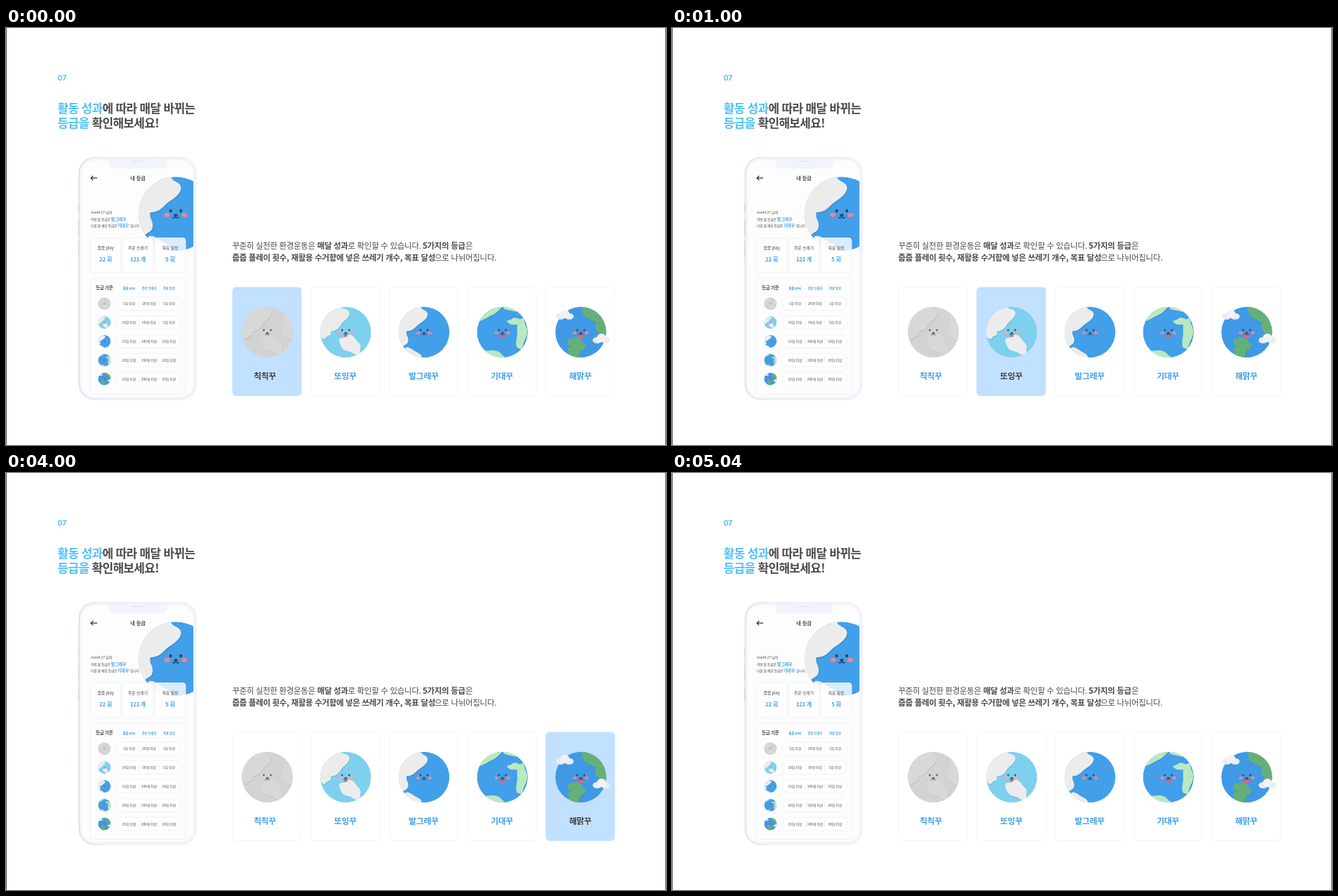
An HTML page that plays this animation: 941x595 px, repeating every 5110 ms.

```html
<!DOCTYPE html>
<html lang="ko">
<head>
<meta charset="utf-8">
<style>
html, body { margin: 0; width: 100%; height: 100%; overflow: hidden; background: #fff; }
svg { display: block; width: 941px; height: 595px; }
text { font-family: "Noto Sans CJK KR", "Noto Sans CJK JP", "Noto Sans CJK", sans-serif; fill: #4a4a4a; }
.b { font-weight: 700; }
.sky { fill: #50c0f8; }
.blue { fill: #3c9fee; }
.mid { text-anchor: middle; }
</style>
</head>
<body>
<svg id="stage" viewBox="0 0 941 595"></svg>
<script>
const R = 36.3, STEP = 111.7;

const box = (x, y, w, h, r, fill = '#fff', stroke = '#f1f2f4', extra = '') =>
  `<rect x="${x}" y="${y}" width="${w}" height="${h}" rx="${r}" fill="${fill}" stroke="${stroke}" ${extra}/>`;

const text = (x, y, size, str, cls = '', gap = 0, extra = '') =>
  `<text x="${x}" y="${y}" font-size="${size}" class="${cls}" letter-spacing="${gap}" ${extra}>${str}</text>`;

const dot = (x, y, rx, ry, fill) => `<ellipse cx="${x}" cy="${y}" rx="${rx}" ry="${ry}" fill="${fill}"/>`;

// Tilted ellipse with a wavy coast; the wave phase follows from its place
function land(x, y, rx, ry, tilt = 0) {
  const pts = Array.from({ length: 72 }, (_, i) => {
    const a = i * Math.PI / 36;
    const r = 1 + 0.1 * Math.sin(3 * a + x) + 0.08 * Math.sin(5 * a + y);
    return [(r * rx * Math.cos(a)).toFixed(1), (r * ry * Math.sin(a)).toFixed(1)];
  });
  return `<polygon points="${pts.join(' ')}" transform="translate(${x} ${y}) rotate(${tilt})"/>`;
}

function face(ink, cheek, tongue) {
  const side = s => dot(s * 5, -3, 1.3, 1.6, ink) + dot(s * 8.5, 1, 2.8, 2, cheek);
  return side(-1) + side(1) + dot(0, 5.2, tongue, tongue * 0.8, '#f0626f') +
    `<path d="M-3.2 3Q-1.5 5 0 2.6Q1.5 5 3.2 3" fill="none" stroke="${ink}"/>` + dot(0, 1.2, 1.9, 1.3, ink);
}

const cloud = (x, y) => `<g transform="translate(${x} ${y})">` +
  [-6, 6, 0].map(dx => dot(dx, dx ? 2 : -1.5, 6.5, dx ? 4.5 : 6, dx ? '#ebecee' : '#f2f2f3')).join('') + '</g>';

const americas = land(-19, -20, 23, 17, -40) + land(-30, 0, 8, 9) + land(7, 18, 17, 11, 35);
const globes = [
  { name: '칙칙꾸', sea: '#d3d3d3', fill: '#d8d8d8', lands: americas + land(32, -12, 10, 24), face: face('#5d5d5d', 'none', 0) },
  { name: '또잉꾸', sea: '#7dd0ee', fill: '#ececec', lands: americas, face: face('#444a55', '#f5a7a7', 2.2) },
  { name: '발그레꾸', sea: '#429fea', fill: '#ececec', face: face('#3a3f4b', '#f28490', 0),
    lands: land(-20, -21, 25, 17, -40) + land(-32, 6, 9, 15) + land(-17, 31, 15, 6, 25) },
  { name: '기대꾸', sea: '#429fea', fill: '#b9e8c1', face: face('#3a3f4b', '#f28490', 3.3),
    lands: land(-18, -30, 22, 7, -30) + land(14, -35, 14, 5, 15) + land(18, -15, 10, 5) + land(27, 2, 7, 22, 5) + land(-13, 34, 20, 7, 15) },
  { name: '해맑꾸', sea: '#3f99e5', fill: '#65b07a', face: face('#3a3f4b', '#f28490', 4),
    lands: land(16, -27, 20, 9, 35) + land(30, -8, 8, 16, -10) + land(-6, 16, 14, 7, 20) + land(-9, 28, 9, 10),
    over: cloud(-22.5, -24.5) + cloud(29.5, 9.5) }
];

const globeDefs = globes.map((g, i) => `<g id="globe${i}"><g clip-path="url(#disc)">
  <circle r="${R}" fill="${g.sea}"/>
  <g fill="#000" opacity=".09" transform="translate(.6 1.1)">${g.lands}</g><g fill="${g.fill}">${g.lands}</g>
  </g>${g.face}${g.over || ''}</g>`).join('');

const globe = (i, x, y, scale = 1) => `<use href="#globe${i}" transform="translate(${x} ${y}) scale(${scale})"/>`;

function phone() {
  const stats = [['줍줍 play', '22 회'], ['주운 쓰레기', '121 개'], ['목표 달성', '5 회']];
  const rows = ['1회 20개 1회', '10회 50개 5회', '15회 100개 10회', '20회 150개 20회', '25회 200개 30회'];
  const col = i => 175.5 + 28.5 * i;
  let s = [251, 274, 304].map(y => box(102.8, y, 2, y > 260 ? 22 : 11, 1, '#cfdbea', 'none')).join('');
  s += box(104.3, 184.8, 167, 345.5, 22, '#f1f4fb', 'url(#rim)', 'stroke-width="1.4"');
  s += box(107.5, 188.5, 160, 338, 18, '#fdfdfe', '#f3f5fa');
  s += '<path d="M145 188.5Q147.5 188.5 147.5 192Q147.5 200.5 156 200.5H221Q229.5 200.5 229.5 192Q229.5 188.5 232 188.5Z" fill="#f1f4fb"/>';
  s += box(179, 189.5, 18, 1.6, 0.8, '#e2e6ee', 'none');
  s += '<path d="M130 214.2H121M124.3 211L121 214.2L124.3 217.4" fill="none" stroke="#333" stroke-width="1.2"/>';
  s += `<g clip-path="url(#screen)">${globe(2, 242, 265.3, 1.46)}</g>`;
  s += text(188, 217, 7.3, '내 등급', 'b mid', -0.2);
  s += text(121, 265, 5, 'mint4.27 님의', '', -0.1);
  s += text(121, 274.6, 4.9, '이번 달 등급은', '', -0.25) + text(149.8, 275, 6, '발그레꾸', 'b blue', -0.15);
  s += text(121, 283.8, 4.9, '다음 달 예상 등급은', '', -0.25) + text(159, 284.2, 6, '기대꾸', 'b blue', -0.15);
  s += text(177, 283.8, 4.9, '입니다', '', -0.25);
  stats.forEach(([label, value], i) => {
    const x = 120 + 46 * i;
    s += box(x, 299.5, 44, 49.5, 4, '#fff', '#eff1f4', 'fill-opacity=".8"');
    s += text(x + 22, 316, 5.9, label, 'mid', -0.15) + text(x + 22, 333.2, 7.8, value, 'b blue mid', -0.2);
    s += text(col(i), 372.6, 4.3, label, 'b blue mid', -0.06);
  });
  s += '<path d="M120 522.5V361.5Q120 357 124.5 357H251.5Q256 357 256 361.5V522.5Z" fill="none" stroke="#eff1f4"/>';
  s += text(128, 373, 6.4, '등급 기준', 'b', -0.15);
  rows.forEach((row, i) => {
    const y = 393.3 + 26.85 * i;
    s += globe(i, 140.3, y, 0.25) + box(157.5, y - 9.5, 92, 19, 9.5);
    s += `<path d="M190 ${y - 5}v10M218 ${y - 5}v10" stroke="#e9e9e9" stroke-width=".7"/>`;
    row.split(' ').forEach((n, j) => s += text(col(j), y + 1.8, 4.9, n + ' 이상', 'mid', -0.08));
  });
  return s;
}

const cards = globes.map((g, i) => {
  const x = 372 + STEP * i;
  return box(x - 49, 370, 98, 154.5, 5, '#fff', '#f4f5f6', 'class="card"') +
    globe(i, x + 0.6, 434) + text(i ? x : x - 3, 500.8, 11.8, g.name, 'b mid label', -0.3);
}).join('');

document.getElementById('stage').innerHTML = `<defs>
  <clipPath id="disc"><circle r="${R}"/></clipPath>
  <clipPath id="screen"><rect x="108" y="200" width="159.2" height="180"/></clipPath>
  <linearGradient id="rim"><stop stop-color="#d3deec"/><stop offset=".2" stop-color="#e8edf6"/><stop offset="1" stop-color="#edf1f9"/></linearGradient>
  ${globeDefs}</defs>
  <path d="M.5 0V595M940.5 0V595" stroke="#5c5c5c"/>
  ${text(73.6, 74.6, 10.3, '07', 'sky', 0, 'style="font-family:Inter,sans-serif;font-weight:700"')}
  ${text(73.5, 120.6, 17, '<tspan class="sky">활동 성과</tspan>에 따라 매달 바뀌는', 'b', -0.68)}
  ${text(73.5, 142, 17, '<tspan class="sky">등급을</tspan> 확인해보세요!', 'b', -0.68)}
  ${phone()}
  ${text(322.5, 314.8, 11.5, '꾸준히 실천한 환경운동은', '', -0.36)}
  ${text(443.7, 314.8, 11.5, '매달 성과', 'b', -0.36)}
  ${text(487.4, 314.8, 11.5, '로 확인할 수 있습니다.', '', -0.3)}
  ${text(594, 314.8, 11.5, '5가지의 등급', 'b', -0.3)}
  ${text(655, 314.8, 11.5, '은')}
  ${text(322.5, 331.8, 11.5, '줍줍 플레이 횟수, 재활용 수거함에 넣은 쓰레기 개수, 목표 달성', 'b', -0.32)}
  ${text(611, 331.8, 11.5, '으로 나뉘어집니다.', '', -0.3)}
  ${cards}`;

const rects = document.querySelectorAll('.card'), labels = document.querySelectorAll('.label');

function draw(now) {
  const t = now % 5110;
  const active = t < 5040 ? Math.min(4, Math.floor(t / 1000)) : -1;
  rects.forEach((rect, i) => {
    const on = i === active;
    rect.setAttribute('fill', on ? '#c2e0ff' : '#fff');
    rect.setAttribute('stroke', on ? '#c6e2ff' : '#f4f5f6');
    labels[i].style.fill = on ? '#3d3d3d' : '#3c9fee';
  });
  requestAnimationFrame(draw);
}
draw(0);
</script>
</body>
</html>
```
